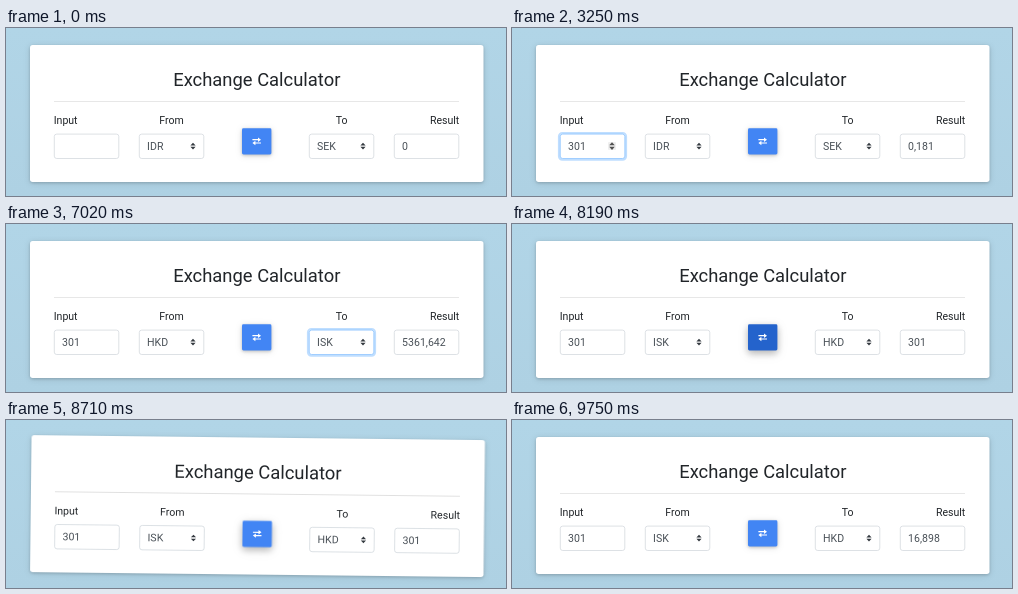
Write an HTML page that moves like this. It is 500 px wide and 168 px high and loops after 9.88 s.

```html
<!DOCTYPE html>
<html lang="en">
<head>
<meta charset="utf-8">
<title>Exchange Calculator</title>
<style>
  html, body { margin: 0; width: 100%; height: 100%; overflow: hidden; background: #b0d4e6; }
  svg { display: block; width: 100vw; height: 100vh; }
  text { font-family: Roboto, Arial, sans-serif; font-size: 10.55px; fill: #212529; white-space: pre; }
  .title { font-size: 18.4px; }
  .value { fill: #495057; }
  .paper { fill: #fff; filter: drop-shadow(0 1.3px 1.65px rgba(0,0,0,.16)) drop-shadow(0 1.3px 3.3px rgba(0,0,0,.12)); }
</style>
</head>
<body>
<svg viewBox="0 0 500 168" preserveAspectRatio="none">
  <defs>
    <linearGradient id="sky" x2="0" y2="1">
      <stop stop-color="#b1d5e7"/><stop offset="1" stop-color="#aed1e3"/>
    </linearGradient>
  </defs>
  <rect width="500" height="168" fill="url(#sky)"/>
  <g id="card">
    <rect class="paper" x="24" y="17" width="453.5" height="137" rx="2.7"/>
    <text class="title" x="250.8" y="58" text-anchor="middle">Exchange Calculator</text>
    <rect x="48" y="73" width="405" height=".8" fill="#000" opacity=".12"/>
    <text x="47.7" y="96">Input</text>
    <text x="165.5" y="96" text-anchor="middle">From</text>
    <text x="335.7" y="96" text-anchor="middle">To</text>
    <text x="453.3" y="96" text-anchor="end">Result</text>
    <g id="fields"></g>
    <g id="spinner">
      <rect x="96" y="114" width="8" height="8" rx="1" fill="#efefef"/>
      <path d="M100 114.2l-2.8 3.1h5.6zM100 121.9l-2.8-3.1h5.6z" fill="#505050"/>
    </g>
    <rect id="caret" y="111.5" width=".8" height="13" fill="#495057"/>
    <rect id="button" x="236" y="100.3" width="29.4" height="26.2" rx="1.4"/>
    <path d="M246.4 111.1h5.6v-1.6l3 2.2l-3 2.2v-1.6h-5.6zM255 114.4h-5.6v-1.6l-3 2.2l3 2.2v-1.6h5.6z" fill="#fff"/>
  </g>
</svg>
<script>
const LOOP = 9880, STEP = 130;
const byId = id => document.getElementById(id);
const [card, spinner, caret, button] = ['card', 'spinner', 'caret', 'button'].map(byId);

function makeField(x, isSelect) {
  const group = document.createElementNS('http://www.w3.org/2000/svg', 'g');
  const arrows = isSelect
    ? `<path d="M${x + 54} 114.8l-2.6 2.6h5.2zM${x + 54} 121.4l-2.6-2.6h5.2z" fill="#343a40"/>` : '';
  group.innerHTML = `
    <rect x="${x - 1}" y="105" width="67" height="26.6" rx="3.4" fill="none" stroke="#007bff" stroke-opacity=".25" stroke-width="2.2"/>
    <rect x="${x + .3}" y="106.1" width="64.5" height="24.4" rx="2.4" fill="#fff" stroke-width=".7"/>
    <text class="value" x="${x + 8.1}" y="121.8"></text>${arrows}`;
  byId('fields').append(group);
  const [glow, box] = group.querySelectorAll('rect'), label = group.querySelector('text');
  return (text, focus) => {
    label.textContent = text;
    glow.setAttribute('opacity', focus);
    box.setAttribute('stroke', mix([206, 212, 218], [128, 189, 255], focus));
  };
}

const mix = (a, b, k) => `rgb(${a.map((v, i) => Math.round(v + (b[i] - v) * k))})`;
const ramp = (t, start, length = 150) => {
  const k = Math.min(1, Math.max(0, (t - start) / length));
  return k * k * (3 - 2 * k);
};
const during = (t, start, end, length) => ramp(t, start, length) - ramp(t, end, length);
const latest = (t, changes) => changes.filter(([at]) => at <= t).pop()[1];

const setInput = makeField(48), setFrom = makeField(133, true);
const setTo = makeField(303, true), setResult = makeField(388);

const typed = [[0, ''], [2080, '3'], [2340, '30'], [2600, '301']];
const from = [[0, 'IDR'], [5200, 'HKD'], [8060, 'ISK']];
const to = [[0, 'SEK'], [7020, 'ISK'], [8060, 'HKD']];
const result = [[0, '0'], [2080, '0,002'], [2470, '0,018'], [2730, '0,181'],
  [5200, '340,324'], [7020, '5361,642'], [8060, '301'], [8970, '16,898']];

// Shake poses: time, x, y, degrees
const shake = [[8190, 0, 0, 0], [8320, -.7, -1.2, -1.05], [8450, .7, .4, .14],
  [8580, -1.9, .7, -.15], [8710, .8, .6, .63], [8840, 0, 0, 0]];

function shakePose(t) {
  const i = shake.findIndex(([at]) => at > t);
  if (i < 1) return [0, 0, 0];
  const a = shake[i - 1], b = shake[i], k = (t - a[0]) / (b[0] - a[0]);
  return [1, 2, 3].map(n => a[n] + (b[n] - a[n]) * k);
}

function drawButton(t) {
  const lift = during(t, 7740, 8800, 300);
  const base = [66, 133, 244];
  const pressed = t >= 8060 && t < 8320;
  const hover = during(t, 7740, 8540, 170);
  button.setAttribute('fill', pressed ? '#2463cc' : mix(base, [92, 152, 246], hover));
  button.style.filter =
    `drop-shadow(0 ${1.3 + 2 * lift}px ${1.65 + 2 * lift}px rgba(0,0,0,${.18 + .02 * lift})) ` +
    `drop-shadow(0 ${1.3 + 1.3 * lift}px ${3 + 2 * lift}px rgba(0,0,0,.13))`;
}

function draw(t) {
  const text = latest(t, typed);
  setInput(text, during(t, 1380, 4090, 200));
  setFrom(latest(t, from), during(t, 4090, 5910, 200));
  setTo(latest(t, to), during(t, 5910, 7730, 200));
  setResult(latest(t, result), 0);

  spinner.setAttribute('opacity', during(t, 700, 4090, 160));
  const caretOn = t >= 1430 && t < 4160 && !(t >= 3250 && t < 3900);
  caret.setAttribute('opacity', caretOn ? 1 : 0);
  caret.setAttribute('x', 55.5 + 5.87 * text.length);

  drawButton(t);
  const [x, y, angle] = shakePose(t);
  card.setAttribute('transform', angle || x || y ? `translate(${x} ${y}) rotate(${angle} 250.7 85.5)` : '');
}

const origin = performance.now();
function tick() {
  const t = (performance.now() - origin) % LOOP;
  draw(Math.floor(t / STEP) * STEP);
  requestAnimationFrame(tick);
}
tick();
</script>
</body>
</html>
```
